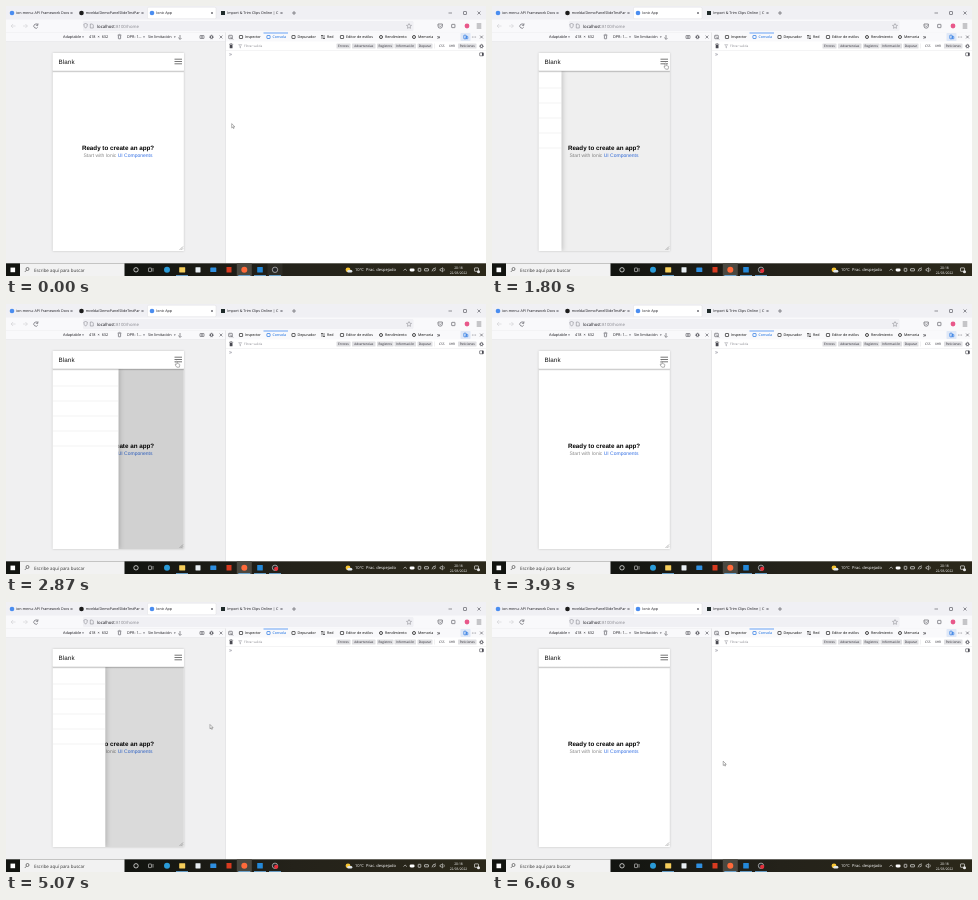
An HTML page for the animation above (7070 ms loop, 480 by 270 pixels).

```html
<!DOCTYPE html>
<html lang="es">
<head>
<meta charset="utf-8">
<style>
html, body { margin: 0; height: 100%; overflow: hidden; background: #fff; }
svg { display: block; width: 100vw; height: 100vh; }
text { font-family: "Open Sans", "Noto Sans", sans-serif; text-rendering: geometricPrecision; white-space: pre; }
.app text { font-family: "Liberation Sans", Arial, sans-serif; }
</style>
</head>
<body>
<svg id="stage" viewBox="0 0 480 270"></svg>
<script>
const INK = '#4a4a52';
const rect = (x, y, w, h, fill, r = 0, extra = '') =>
  `<rect x="${x}" y="${y}" width="${w}" height="${h}" rx="${r}" fill="${fill}" ${extra}/>`;
const dot = (x, y, r, fill, extra = '') => `<circle cx="${x}" cy="${y}" r="${r}" fill="${fill}" ${extra}/>`;
const line = (d, color = INK, w = .6) =>
  `<path d="${d}" fill="none" stroke="${color}" stroke-width="${w}"/>`;
const text = (x, y, size, str, fill = '#15141a', extra = '') =>
  `<text x="${x}" y="${y}" font-size="${size}" fill="${fill}" ${extra}>${str}</text>`;
const cross = (x, y, r = 1.2) => line(`M${x - r} ${y - r}l${2 * r} ${2 * r}m0 ${-2 * r}l${-2 * r} ${2 * r}`);
const box = (x, y, w, h, color = INK) => rect(x - w / 2, y - h / 2, w, h, 'none', .4, `stroke="${color}" stroke-width=".6"`);
const ring = (x, y, r, color = INK, w = .7, extra = '') =>
  dot(x, y, r, 'none', `stroke="${color}" stroke-width="${w}" ${extra}`);
const gear = (x, y) => ring(x, y, 1.3, INK, .9) + ring(x, y, 2, INK, .5, 'stroke-dasharray=".8 .77"');
const caret = (x, y) => `<path d="M${x - 1} ${y - .5}h2l-1 1.3z" fill="${INK}"/>`;

function browser() {
  let s = rect(0, 0, 480, 14, '#f0f0f4') + rect(141.5, 1.2, 68.5, 11.6, '#fff', 1.2, 'stroke="#d8d8dc" stroke-width=".4"');
  const tabs = [
    [6, '#4a8df0', 'ion-menu: API Framework Docs', 65.5],
    [75.5, '#1b1b1b', 'mvelda/DemoPanelSlideTestPart', 136.5],
    [146, '#4a8df0', 'Ionic App', 206],
    [217, '#1f2a2a', 'Import &amp; Trim Clips Online | C', 275.5]
  ];
  tabs.forEach(([x, color, name, end], i) => {
    s += i < 3 ? dot(x, 7, 2.3, color) : rect(x - 2, 5, 4, 4, color);
    s += text(x + 4.2, 8.3, 3.65, name) + rect(end - 2.5, 3, 5, 8, i === 2 ? '#fff' : '#f0f0f4') + cross(end, 7, 1);
  });
  s += line('M286 7h4m-2-2v4M442.5 7h3.5') + box(459, 7, 3, 3) + cross(473, 7, 1.5);

  s += rect(0, 13.5, 480, 13, '#f9f9fb') + rect(77, 15, 330.5, 10, '#f0f0f4', 1.2);
  s += line('M9.5 20h-4.4m2-2l-2 2 2 2M17 20h4.4m-2-2l2 2-2 2', '#c4c4c9', .5);
  s += line('M31.7 19a2.1 2.1 0 1 0 .1 2M31.9 17.3v2h-2');
  s += line('M77.8 18.2l1.8-.7 1.8.7q0 2.8-1.8 4q-1.8-1.2-1.8-4z', '#77777e', .5);
  s += line('M84.3 18h2l1 1v3h-3z', '#77777e', .5);
  s += text(91, 21.6, 4.28, 'localhost<tspan fill="#85858c">:8100/home</tspan>');
  s += line('M403 17.6l.8 1.6 1.7.2-1.3 1.2.3 1.7-1.5-.8-1.5.8.3-1.7-1.3-1.2 1.7-.2z', '#66666d', .4);
  s += line('M432 18h4.4v2a2.2 2.2 0 0 1-4.4 0zM433 19.4l1.2 1.2 1.2-1.2');
  s += box(447.3, 20, 3.3, 3.3) + dot(461, 20, 2.4, '#e8588a') + line('M470.7 18h4.6m-4.6 2h4.6m-4.6 2h4.6');
  return s + rect(0, 26, 480, .5, '#dcdce0');
}

function devtools() {
  let s = rect(0, 26.5, 219.5, 231, '#f0f0f1') + rect(0, 26.5, 219.5, 9, '#f9f9fb') + rect(0, 35.2, 480, .4, '#dedee2');
  [[57, 'Adaptable', 77], [83, '418  ×  632', 0], [121, 'DPR: 1…', 138], [142, 'Sin limitación', 168.8]].forEach(([x, str, end]) => {
    s += text(x, 32.3, 3.8, str) + (end ? caret(end, 31) : '');
  });
  s += box(113.5, 31, 2.2, 3.6) + line('M111.5 29.2q2-1.8 4 0', INK, .4) + line('M174 29v3.5m-1.5-1l1.5 2 1.5-1.5');
  s += box(196, 31, 4, 3) + dot(196, 31, .8, INK) + gear(205.5, 31) + cross(215, 31, 1.4);

  s += rect(219.5, 26.5, 260.5, 231, '#fff') + rect(219.5, 26.5, 260.5, 9, '#f9f9fb') + rect(219.3, 26.5, .5, 231, '#d0d0d4');
  s += box(224.5, 31, 3.6, 3.4) + line('M224 30.5l3 3');
  s += rect(257.5, 26.7, 24.5, .6, '#0a6cf0');
  [[235, 'Inspector'], [262.5, 'Consola'], [287.5, 'Depurador'], [317, 'Red'], [336, 'Editor de estilos'],
   [375, 'Rendimiento'], [408, 'Memoria']].forEach(([x, str], i) => {
    const color = i === 1 ? '#0060df' : '#000';
    s += i === 3 ? line(`M${x - 1} 33v-4m-1 1l1-1 1 1M${x + 1} 29v4m-1-1l1 1 1-1`, color, .5)
       : i > 4 ? ring(x, 31, 1.5, color) : box(x, 31, 3.2, 3, color);
    s += text(x + 4, 32.3, 3.62, str, color);
  });
  s += text(431, 33, 6.5, '»') + rect(454.5, 27, 10, 8, '#dfe8f7', .8) + box(459, 31, 2.4, 3.6, '#0060df') + box(461, 31.6, 1.6, 2.4, '#0060df');
  s += [466.3, 468, 469.7].map(x => dot(x, 31, .45, INK)).join('') + cross(475.5, 31, 1.4);

  s += rect(219.8, 44.6, 260.2, .4, '#e3e3e6');
  s += rect(223.7, 39, 2.8, 3.3, INK, .3) + line('M223 38.3h4.2m-2.8-.7h1.4');
  s += line('M232.7 38.6h3l-1.2 1.6v1.8l-.6-.4v-1.4z', '#8a8a90', .4) + text(238, 41.3, 3.2, 'Filtrar salida', '#8a8a90');
  [[330.5, 14, 'Errores'], [346, 23.5, 'Advertencias'], [371, 16.5, 'Registros'], [388.5, 21.5, 'Información'],
   [411.5, 15, 'Depurar'], [431.5, 8.5, 'CSS', 1], [441.5, 9, 'XHR', 1], [452, 18.5, 'Peticiones']].forEach(([x, w, str, plain]) => {
    s += (plain ? '' : rect(x, 37.6, w, 5, '#dfdfe2', .6)) + text(x + w / 2, 41.3, 3.2, str, '#2b2a33', 'text-anchor="middle"');
  });
  s += rect(428.7, 37.5, .3, 5, '#d0d0d4') + gear(475.5, 40.2);
  return s + text(223, 50.1, 6, '»', '#7a7a88') + box(475.5, 48.3, 3.8, 3) + rect(476, 46.8, 1.4, 3, INK);
}

function phone() {
  const rows = [0, 1, 2, 3, 4].map(i =>
    text(51.6, 76 + i * 15, 5, 'Menu Item', '#111') + rect(52, 81.8 + i * 15, 90.2, .4, '#dedede')).join('');
  return `<g class="app">` + rect(46.8, 47, 131, 198, '#fff', 0, 'style="filter:drop-shadow(0 .4px .8px #0003)"') +
    text(112, 144.1, 6.26, 'Ready to create an app?', '#000', 'font-weight="700" text-anchor="middle"') +
    text(77.5, 151.2, 5, 'Start with Ionic <tspan fill="#3470e4">UI Components</tspan>', '#8c8c8c') +
    `<g clip-path="url(#view)">` + rect(46.8, 64.6, 131, 180.4, '#000', 0, 'id="shade"') +
    `<g id="menu">` + rect(46.8, 64.6, 95.2, 180.4, '#fff', 0, 'style="filter:drop-shadow(1.2px 0 2.5px #0003)"') + rows + '</g></g>' +
    rect(46.8, 64.6, 131, 2.2, 'url(#fall)') + rect(46.8, 47, 131, 17.6, '#fff') +
    text(52.6, 58.1, 6.26, 'Blank', '#111', 'letter-spacing=".08"') +
    line('M168.5 53.2h7.5m-7.5 2.3h7.5m-7.5 2.3h7.5', '#555', .8) +
    line('M173.5 244l3.5-3.5m-1.7 3.5l1.7-1.7', '#777', .5) + '</g>';
}

function taskbar() {
  let s = rect(0, 257.3, 480, 12.7, 'url(#bar)') + rect(4.5, 261.6, 4.6, 4.6, '#fff');
  s += rect(14, 257.3, 104.5, 12.7, '#f2f2f2') + ring(21.5, 263, 1.5, '#333', .6) + line('M20.4 264.2l-1.6 1.8', '#333');
  s += text(28, 265.5, 4.45, 'Escribe aquí para buscar', '#333');
  s += ring(130, 263.8, 2.2, '#fff') + box(144, 263.8, 3, 3.6, '#ddd') + line('M147 262v3.6', '#ddd');
  s += rect(230.8, 257.3, 15, 12.7, '#4a4840') + rect(261.5, 257.3, 15, 12.7, '#fff', 0, 'id="hover"');
  s += dot(161, 263.8, 3, '#2a9bd8') + rect(173.2, 261.2, 6, 5.2, '#f5cd5b', .4) + rect(189.5, 261.2, 5, 5.2, '#e8eef2', .4);
  s += rect(204.3, 261.5, 6, 4.6, '#2f8fe0', .4) + rect(220.5, 261, 5, 5.6, '#d83b20', .4);
  s += dot(238.3, 263.8, 3, '#ff6a3a') + rect(251.2, 261, 5.6, 5.6, '#2488d8', .5);
  s += dot(269, 263.8, 2.7, '#25272a', 'stroke="#c9c9c9" stroke-width=".7"') + dot(270.2, 264.8, 2.1, '#e5303c', 'id="rec"');
  [176, 238.3, 254, 269].forEach(x => s += rect(x - 6, 269.2, 12, .8, '#76b9ed'));
  s += dot(342, 263.8, 2.4, '#f6c534') + rect(341.3, 264, 5, 2.5, '#dfe5ea', 1.2);
  s += text(349, 265.4, 4.05, '10°C  Prac. despejado', '#fff');
  s += line('M397.6 264.6l1.6-1.6 1.6 1.6', '#fff') + rect(403.6, 262.6, 5, 2.8, '#fff', 1.4) + box(413.5, 263.8, 2.6, 3, '#fff');
  s += box(420.5, 263.8, 4, 2.2, '#fff') + line('M426 265.3a4 4 0 0 1 4-3.4m-2.2 3.4a2.2 2.2 0 0 1 2.2-1.6', '#fff');
  s += line('M434 263h1l1.5-1.3v4.2l-1.5-1.3h-1zM437.7 262.3q1.2 1.5 0 3', '#fff', .5);
  s += text(452.5, 262.6, 3.4, '20:18', '#fff', 'text-anchor="middle"') + text(452.5, 268, 3.3, '22/03/2022', '#fff', 'text-anchor="middle"');
  return s + box(470.5, 263.6, 4, 3.4, '#fff') + dot(472.5, 265.8, 1.5, '#e8e8e8');
}

const pointers =
  `<g id="cursor" stroke="#555" stroke-width=".45" fill="#fff" stroke-linejoin="round">
    <path id="arrow" d="M0 0v4.3l1-.9.7 1.5.7-.3-.7-1.5h1.4z"/>
    <path id="hand" d="M-.6 .5q.6-.9 1.2 0v2l1.8.5q.8.3.6 1.1l-.5 2.1h-2.5l-1.6-2.2q-.1-.8.6-.7l.4.4z"/>
  </g>`;

stage.innerHTML = `<defs>
    <clipPath id="view"><rect x="46.8" y="64.6" width="131" height="180.4"/></clipPath>
    <linearGradient id="fall" x2="0" y2="1"><stop stop-color="#000" stop-opacity=".32"/><stop offset="1" stop-color="#000" stop-opacity="0"/></linearGradient>
    <linearGradient id="bar"><stop offset=".25" stop-color="#121410"/><stop offset=".6" stop-color="#24221a"/><stop offset="1" stop-color="#2b281a"/></linearGradient>
  </defs>` + browser() + devtools() + phone() + taskbar() + pointers;

const $ = id => document.getElementById(id);
const clamp = v => Math.max(0, Math.min(1, v));
const smooth = v => v * v * (3 - 2 * v);

function bezier(x1, y1, x2, y2) {
  const at = (a, b, s) => 3 * (1 - s) ** 2 * s * a + 3 * (1 - s) * s * s * b + s ** 3;
  return x => {
    let lo = 0, hi = 1;
    for (let i = 0; i < 20; i++) {
      const mid = (lo + hi) / 2;
      if (at(x1, x2, mid) < x) lo = mid; else hi = mid;
    }
    return at(y1, y2, lo);
  };
}
const easeOpen = bezier(0, 0, .2, 1), easeClose = bezier(.4, 0, .6, 1);

const LOOP = 7070, STEP = 200 / 3, SLIDE = 300;
const visits = [[1778, 2752], [4045, 4926]]; // menu opens, closes
const path = [ // time, x, y of the pointer tip
  [0, 225.7, 117.6], [670, 225.7, 117.6], [1400, 174, 58], [1530, 173.6, 57], [1800, 173.6, 57], [2470, 171, 57],
  [2870, 170.8, 57], [3470, 168.8, 59], [3730, 168.6, 66], [3930, 169.8, 57], [4070, 169.8, 57],
  [4330, 174.4, 68], [4730, 172, 58], [4930, 172, 58.5], [5067, 204, 122.5], [5330, 231.2, 159.2], [LOOP, 231.2, 159.2]
];

function pointerAt(t) {
  const i = path.findIndex(p => p[0] > t);
  const [a, b] = [path[i - 1], path[i]];
  const k = smooth((t - a[0]) / (b[0] - a[0]));
  return [a[1] + (b[1] - a[1]) * k, a[2] + (b[2] - a[2]) * k];
}

function menuAt(t) {
  const [open, close] = visits[t < 4000 ? 0 : 1];
  return t < close ? easeOpen(clamp((t - open) / SLIDE)) : 1 - easeClose(clamp((t - close) / SLIDE));
}

function draw(now) {
  const t = Math.floor((now % LOOP) / STEP + .06) * STEP;
  const p = menuAt(t), over = t >= 1390 && t < 4960;
  const [x, y] = pointerAt(Math.min(t, LOOP - 1));
  $('menu').setAttribute('transform', `translate(${95.2 * (p - 1)})`);
  $('menu').style.display = p > .001 ? '' : 'none';
  $('shade').setAttribute('opacity', .26 * p);
  $('cursor').setAttribute('transform', `translate(${x} ${y})`);
  $('hand').style.display = over ? '' : 'none';
  $('arrow').style.display = over ? 'none' : '';
  $('hover').setAttribute('opacity', .05 * (1 - clamp(t / 467)));
  $('rec').setAttribute('opacity', t > 720 ? 1 : 0);
}

const start = performance.now();
(function tick() {
  draw(performance.now() - start);
  requestAnimationFrame(tick);
})();
</script>
</body>
</html>
```
